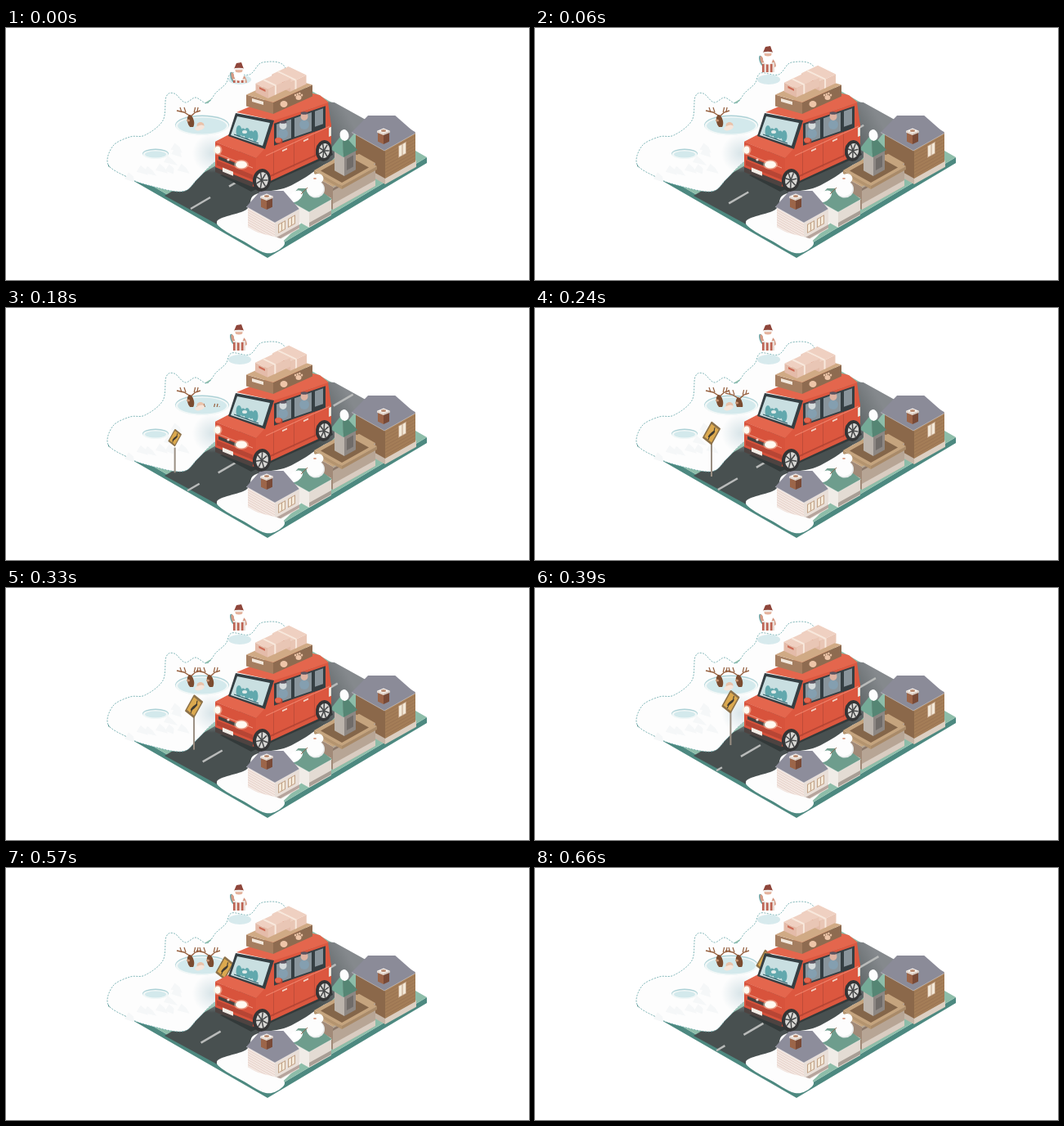
Recreate the animation shown at these times as an HTML page with a canvas. Size 640 by 308 pixels, loop 0.69 s.

```html
<!DOCTYPE html>
<html lang="en">
<head>
<meta charset="utf-8">
<title>Winter drive</title>
<style>
  html, body { margin: 0; width: 100%; height: 100%; overflow: hidden; background: #fff; }
  canvas { display: block; }
</style>
</head>
<body>
<canvas id="stage" width="640" height="308"></canvas>
<script>
const ctx = document.getElementById('stage').getContext('2d');
const LOOP = 690, STEP = 30, SLOPE = 0.56, TAU = Math.PI * 2;
const clamp = v => Math.min(1, Math.max(0, v));
const easeOut = p => 1 - (1 - clamp(p)) ** 3;

function poly(fill, ...pts) {
  ctx.beginPath();
  for (let i = 0; i < pts.length; i += 2) ctx.lineTo(pts[i], pts[i + 1]);
  ctx.closePath();
  ctx.fillStyle = fill;
  ctx.fill();
}
function line(color, width, ...pts) {
  ctx.beginPath();
  for (let i = 0; i < pts.length; i += 2) ctx.lineTo(pts[i], pts[i + 1]);
  ctx.strokeStyle = color;
  ctx.lineWidth = width;
  ctx.stroke();
}
function oval(fill, x, y, rx, ry = rx, turn = 0) {
  ctx.beginPath();
  ctx.ellipse(x, y, rx, ry, turn, 0, TAU);
  ctx.fillStyle = fill;
  ctx.fill();
}
function rect(fill, x, y, w, h) {
  ctx.fillStyle = fill;
  ctx.fillRect(x, y, w, h);
}
// Smooth closed curve through the given points
function blob(fill, pts) {
  const n = pts.length, p = i => pts[(i + n) % n];
  ctx.beginPath();
  ctx.moveTo(pts[0], pts[1]);
  for (let i = 0; i < n; i += 2) {
    const bend = (k, j) => p(k) + (p(k + j) - p(k - j)) / 6;
    ctx.bezierCurveTo(bend(i, 2), bend(i + 1, 2), bend(i + 2, -2), bend(i + 3, -2), p(i + 2), p(i + 3));
  }
  ctx.fillStyle = fill;
  ctx.fill();
}
// Draws on an upright wall that starts at x, y and rises or falls to the right
function wall(x, y, slope, draw) {
  ctx.save();
  ctx.transform(1, slope, 0, 1, x, y);
  draw();
  ctx.restore();
}
// Box seen from above: x, y is its lowest corner, l and r the widths of the two walls
function box(x, y, l, r, h, [top, left, right], sl = SLOPE, sr = SLOPE) {
  wall(x - l, y - h - l * sl, sl, () => rect(left, 0, 0, l, h));
  wall(x, y - h, -sr, () => rect(right, 0, 0, r, h));
  y -= h;
  poly(top, x, y, x - l, y - l * sl, x + r - l, y - l * sl - r * sr, x + r, y - r * sr);
}
function hipRoof(fill, x, y, l, r, rise) {
  poly(fill, x, y, x - l, y - l * SLOPE, x - l * 0.5, y - rise, x + r * 0.35, y - rise, x + r, y - r * SLOPE);
  line('rgba(255,255,255,.35)', 1, x - l, y - l * SLOPE, x, y, x + r, y - r * SLOPE);
}

function ground(t) {
  box(320, 281, 195, 195, 7, ['#8dbda9', '#4d8980', '#4d8980'], 0.575, 0.595);
  const asphalt = ctx.createLinearGradient(360, 130, 415, 100);
  asphalt.addColorStop(0, '#485050');
  asphalt.addColorStop(1, '#85898d');
  poly(asphalt, 194, 205, 390, 90, 402, 91, 440, 112, 384, 180, 264, 243);
  // Lane marks run backwards along the road
  for (let x = 238 + (t * 0.187) % 47 - 47; x < 420; x += 47) {
    if (x > 215) line('#b9bbba', 2.5, Math.max(x - 12, 222), 214 - (Math.max(x - 12, 222) - 238) * 0.58, x + 12, 207 - (x - 238) * 0.58);
  }
}

function pond(x, y, rx, ry) {
  oval('#acd1d6', x, y - 0.5, rx, ry);
  oval('#f1f7f7', x, y + 0.5, rx - 0.5, ry - 0.5);
  oval('#d3e9ec', x, y + 0.5, rx - 3, ry - 2);
}

function mountain() {
  blob('#fdfdfd', [
    125, 167, 131, 144, 152, 133, 170, 131, 192, 113, 196, 84, 206, 80, 219, 91, 232, 85, 246, 92,
    257, 79, 269, 68, 276, 55, 298, 57, 314, 42, 342, 50,
    330, 110, 260, 160, 235, 184, 215, 200, 170, 191, 150, 183
  ]);
  ctx.setLineDash([2, 1.5]);
  ctx.strokeStyle = '#62a5a8';
  ctx.lineWidth = 0.8;
  ctx.stroke();
  ctx.setLineDash([]);
  // Faint folds in the snow
  let seed = 7;
  const random = () => (seed = seed * 16807 % 2147483647) / 2147483647;
  for (let i = 0; i < 9; i++) {
    const x = 150 + random() * 70, y = 135 + random() * 45;
    poly('#f5f7f8', x, y, x + 6, y + 5, x + 5 + random() * 8, y + 12, x - 5, y + 8);
  }
  const haze = ctx.createRadialGradient(252, 153, 2, 252, 153, 24);
  haze.addColorStop(0, 'rgba(205,221,226,.7)');
  haze.addColorStop(1, 'rgba(205,221,226,0)');
  oval(haze, 252, 153, 24);
  pond(183, 154, 16, 6);
  pond(240, 119, 33, 12);
  oval('#d7eaed', 286, 63, 14, 6);
}

function santa(t) {
  ctx.save();
  ctx.beginPath();
  ctx.rect(260, 10, 50, 57);
  ctx.clip();
  ctx.translate(285, 22 * (1 - easeOut(t / 110)));
  oval('#6ba7a8', -8, 38, 2.4, 6.5, -0.3);
  oval('#d69a84', -7, 38, 2, 6, -0.3);
  oval('#d69a84', 7, 41, 2, 5, -0.4);
  rect('#eadfd8', -7, 40, 15, 12);
  for (let x = -7; x < 8; x += 5) rect('#bd6252', x, 42, 2.5, 10);
  oval('#fff', 0, 36, 6, 6.5);
  oval('#e4b29b', 0, 30, 4.5, 2.5);
  poly('#8f463b', -6, 28, -3, 21, 3, 20, 6, 28);
  oval('#f4efec', 0, 28, 6.5, 1.3);
  oval('#fff', 6, 23, 1.5);
  ctx.restore();
}

function deer(x, y) {
  ctx.save();
  ctx.translate(x, y);
  for (const side of [-1, 0.7]) {
    line('#96603f', 1.4, 0, -4, side * 8, -9, side * 17, -11);
    for (const reach of [6, 11]) line('#96603f', 1.2, side * reach, -9, side * (reach + 2), -15);
  }
  oval('#7b4c30', 0, 2, 4, 8, -0.2);
  oval('#c99676', -3, 1, 2, 1.5);
  ctx.restore();
}

function bathers(t) {
  ctx.save();
  ctx.beginPath();
  ctx.rect(200, 85, 80, 36);
  ctx.clip();
  deer(226, 112);
  if (t >= 180) deer(250, 112 + 20 * (1 - easeOut((t - 180) / 130)));
  ctx.restore();
  oval('#e9c2aa', 238, 119, 4.5, 4);
  oval('#f5e5da', 237, 122, 6, 3, -0.3);
}

function sign(t) {
  if (t < 110) return;
  const time = Math.max(t, 180) - 240, grow = clamp((t - 90) / 120);
  ctx.save();
  ctx.translate(216 + time * 0.156, 153 - time * 0.093);
  if (t > 150) line('#9a8f83', 2, 0, 12, 0, 12 + 41 * grow);
  // A square standing on its corner, turned to face the road
  ctx.transform(grow, -0.5 * grow, 0, grow, 0, 0);
  ctx.lineJoin = 'round';
  poly('#dba94f', 0, -13, 10, 0, 0, 13, -10, 0);
  ctx.closePath();
  ctx.strokeStyle = '#8c7149';
  ctx.lineWidth = 2;
  ctx.stroke();
  oval('#403a31', 0, 1, 4.5, 1.8, -0.4);
  line('#403a31', 1.2, -4, 6, -2, 2, 3, 0, 4, -5);
  ctx.restore();
}

function chimney(x, y) {
  box(x, y + 11, 7, 7, 12, ['#b98a70', '#9c6549', '#794a37'], 0.45, 0.45);
  box(x, y, 8, 8, 2, ['#f6f2ee', '#e6ddd6', '#d8cec6'], 0.4, 0.4);
  oval('#b98a70', x, y - 5.5, 3, 1.5);
}

function windowPane(x, y, w, h) {
  wall(x, y, -SLOPE, () => {
    rect('#c0a084', 0, 0, w, h);
    for (const dx of [1, w / 2 + 0.5]) rect('#f3e8d8', dx, 1, w / 2 - 1.5, h - 2);
  });
}

function bigHouse() {
  box(464, 191, 37, 38, 8, ['#c9b9a9', '#c5b5a6', '#dccfc2']);
  box(464, 184, 36, 37, 36, ['#8c8c9a', '#8b684a', '#a47d57']);
  wall(464, 152, -SLOPE, () => {
    for (let y = 0; y < 32; y += 4) rect('#967150', 0, y, 37, 0.8);
  });
  windowPane(480, 144, 10, 15);
  hipRoof('#8b8b98', 463, 150, 40, 38, 43);
  chimney(462, 131);
}

function towerHouse() {
  box(400, 222, 20, 52, 28, ['#c5a47e', '#a18a78', '#b7a595']);
  wall(400, 196, -SLOPE, () => {
    rect('#8b786a', 0, 0, 52, 3);
    rect('#d9cdc2', 0, 19, 52, 7);
  });
  box(411, 197, 34, 43, 4, ['#c5a47e', '#b4946f', '#a98a68']);
  box(411, 189, 26, 33, 0, ['#84664a', '', '']);
  box(414, 181, 12, 14, 27, ['#777', '#bcb4ac', '#8d8783']);
  wall(417, 160, -SLOPE, () => rect('#706c69', 0, 0, 8, 14));
  poly('#75aa97', 412, 129, 397, 148, 413, 158);
  poly('#558674', 412, 129, 430, 149, 413, 158);
  oval('#fdfdfd', 414, 131, 5.5, 7, -0.2);
}

function cottage() {
  box(371, 244, 25, 27, 21, ['#fff', '#f0ece7', '#e3dbd3']);
  wall(371, 238, -SLOPE, () => rect('#a89e95', 0, 0, 27, 5));
  hipRoof('#6e9d8d', 371, 225, 27, 28, 29);
  oval('#fff', 354, 206, 10, 6, -0.6);
  oval('#e9ecec', 379, 197, 11, 10.5);
  oval('#fdfdfd', 378, 196, 10.5, 10);
  oval('#fdfdfd', 382, 184, 6.5, 6);
  line('#8d6a52', 1, 369, 195, 361, 203);
  oval('#c77556', 378, 184, 2, 0.8);
}

function frontHouse() {
  box(329, 262, 33, 30, 25, ['#fff', '#f3e7e1', '#e9dfd8']);
  wall(296, 219, SLOPE, () => {
    for (let y = 3; y < 24; y += 3) rect('#e3cbc3', 0, y, 33, 0.8);
  });
  wall(329, 257, -SLOPE, () => rect('#b6a59d', 0, 0, 30, 4));
  for (const x of [333, 345]) windowPane(x, 240 - (x - 333) * SLOPE, 9, 11);
  hipRoof('#8d8d9b', 329, 238, 35, 30, 39);
  chimney(319, 211);
}

function village() {
  blob('#fcfcfc', [258, 237, 294, 222, 304, 204, 340, 196, 364, 184, 398, 164, 402, 190, 345, 255, 322, 268, 290, 260]);
  bigHouse();
  towerHouse();
  cottage();
  frontHouse();
  blob('#fdfdfd', [258, 239, 280, 231, 300, 247, 337, 258, 338, 268, 318, 275, 285, 257]);
}

function wheel(x, y, rx, ry, t) {
  oval('#343536', x, y, rx + 1, ry + 1, 0.15);
  oval('#d8d7d4', x + 0.5, y, rx * 0.74, ry * 0.76, 0.15);
  for (let i = 0; i < 7; i++) {
    const a = i * TAU / 7 - t / 55;
    line('#454748', 1.5, x, y, x + Math.cos(a) * rx * 0.73, y + Math.sin(a) * ry * 0.75);
  }
}

function suitcase(x, y, l, r, h) {
  box(x, y, l, r, h, ['#efd0c1', '#e4bba9', '#e9c6b5'], 0.48, 0.47);
  wall(x, y - h, -0.47, () => rect('#f8e8dc', r * 0.3, 0, 2, h));
  wall(x - l, y - h - l * 0.48, 0.48, () => rect('#cb6a55', l * 0.3, 2, l * 0.5, 2.5));
  line('#f8e8dc', 2, x + r * 0.35, y - h - r * 0.16, x + r * 0.35 - l, y - h - r * 0.16 - l * 0.48);
}

function luggage(t) {
  const hop = Math.cos((t - 120) / 270 * TAU);
  box(327, 105, 33, 48, 14, ['#d0aa85', '#a57e60', '#8e6b50'], 0.29, 0.45);
  wall(301, 86, 0.29, () => rect('#f2e7dc', 0, 0, 14, 4));
  oval('#edc4a7', 340, 93, 4.5, 4);
  oval('#edc4a7', 358, 85, 3.5, 3);
  for (let i = 0; i < 4; i++) oval('#edc4a7', 354 + i * 2.7, 82 - i % 3, 1.2, 1.6);
  suitcase(348 + hop * 0.5, 77 - hop, 22, 20, 11);
  suitcase(320 - hop * 0.5, 85 - hop, 15, 28, 11);
}

function car(t) {
  const red = '#dc573f', light = '#e4664d', dark = '#b64534', ink = '#353f43';
  poly('#333a3a', 262, 180, 300, 200, 400, 155, 395, 140);
  box(306, 195, 50, 92, 36, [red, '#d8533c', red], 0.4, 0.46);
  poly(light, 256, 139, 273, 130, 317, 147, 306, 159);
  poly(red, 328, 113, 394, 91, 398, 119, 306, 160, 317, 147);
  poly(light, 282, 103, 350, 74, 384, 82, 395, 91, 328, 113);
  poly(ink, 281, 104, 328, 113, 317, 148, 272, 132);
  poly('#c9dfe1', 283, 108, 323, 116, 314, 144, 275, 131);
  for (let i = 0; i < 5; i++) oval('#62a8ad', 285 + i * 5, 126 + i * 1.5, 3.5, i % 2 ? 5 : 7);
  oval('#e0ebe9', 292, 127, 3, 2);
  line('#305a63', 1.2, 279, 130, 309, 141);

  wall(256, 139, 0.4, () => {
    rect('#f09a82', 2, 13, 44, 1);
    rect('#45413f', 4, 16, 26, 4);
    rect(dark, 2, 22, 44, 6);
    rect('#4d4341', 0, 31, 46, 6);
    rect('#f3eee7', 9, 28, 13, 5);
  });
  oval('#f5d8cd', 272, 161, 1.6);

  // Side windows with the passengers behind them
  wall(330, 113, -0.34, () => {
    rect(ink, -2, 3, 63, 27);
    for (const [x, w] of [[1, 18], [23, 21], [48, 10]]) rect('#89959c', x, 5, w, w > 10 ? 23 : 19);
  });
  for (const [x, y, skin] of [[339, 119, '#d5dbdc'], [365, 108, '#dfb3a2']]) {
    oval('#849fb0', x, y + 10, 6, 6);
    oval(skin, x, y, 4.5, 5);
    oval('#5b5360', x, y - 4, 4.5, 1.8);
  }

  wall(306, 160, -0.46, () => {
    for (const x of [21, 46, 71]) rect('#bf4c39', x, 0, 1, 31);
    rect('#ef8169', 12, 1, 78, 1.2);
    rect(dark, 18, 28, 56, 2);
    for (const x of [32, 58]) rect('#f1d1c4', x, 4, 6, 2);
    rect('#ece6dc', 89, 3, 3, 11);
  });
  oval(dark, 334, 138, 4.5, 3.5);
  oval(light, 333, 137, 4, 3);
  wheel(313, 186, 10, 13, t);
  wheel(389, 150, 9, 12, t);
  for (const [x, y, r] of [[259, 149, 3.5], [288, 167, 7]]) {
    oval('rgba(255,243,214,.4)', x, y, r + 2, 6);
    oval('#fffaf0', x, y, r, 4.5);
  }
  luggage(t);
}

function draw(t) {
  rect('#fff', 0, 0, 640, 308);
  ground(t);
  mountain();
  santa(t);
  bathers(t);
  sign(t);
  village();
  car(t);
}

let start;
function tick(now) {
  start ??= now;
  draw(Math.floor(((now - start) % LOOP) / STEP) * STEP);
  requestAnimationFrame(tick);
}
draw(0);
requestAnimationFrame(tick);
</script>
</body>
</html>
```
